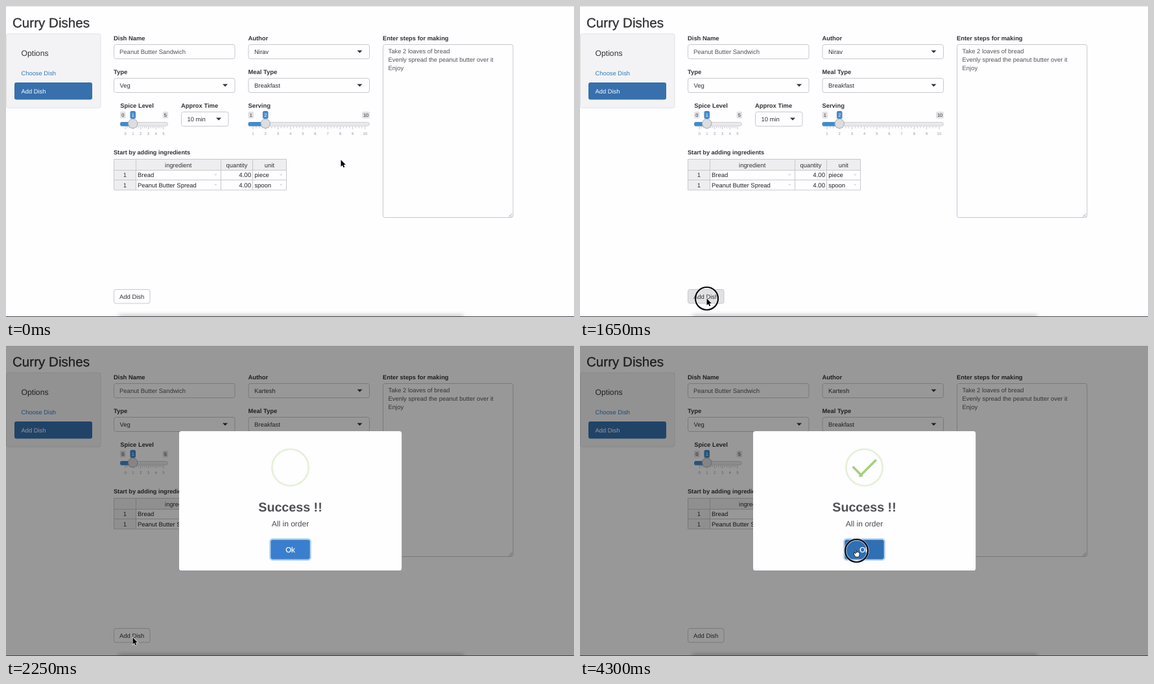
An HTML page for the animation above (4350 ms loop, 876 by 480 pixels).

```html
<!DOCTYPE html>
<html lang="en">
<head>
<meta charset="utf-8">
<title>Dish form</title>
<style>
html, body { margin: 0; width: 100%; height: 100%; overflow: hidden; background: #fefdff; }
svg { display: block; }
text { font-family: "Liberation Sans", Arial, sans-serif; text-rendering: geometricPrecision; white-space: pre; }
</style>
</head>
<body>
<svg width="876" height="480" viewBox="0 0 876 480">
  <defs>
    <filter id="soft" x="-5%" y="-200%" width="110%" height="500%"><feGaussianBlur stdDeviation="3.5"/></filter>
  </defs>
  <g id="page"></g>
  <rect id="shade" width="876" height="480" opacity=".4"/>
  <g id="modal">
    <rect x="267" y="133" width="343.2" height="215" rx="3.6" fill="#fefdff"/>
    <circle cx="438.5" cy="189" r="28.2" fill="none" stroke="#e5f0d5" stroke-width="2.6"/>
    <g transform="translate(409 161) scale(.718)" stroke="#a5d07c" stroke-width="5" stroke-linecap="round">
      <path id="tip"/><path id="long"/>
    </g>
    <g id="dialog"></g>
  </g>
  <path d="M0 .5H876" stroke="#e4e4e6"/>
  <path d="M0 479.5H876" stroke="#444"/>
  <g id="ring" fill="none">
    <circle r="17.3" stroke="#fff" stroke-width="4" opacity=".55"/>
    <circle r="17.5" stroke="#0b0b0e" stroke-width="2.2"/>
  </g>
  <path id="arrow" d="M0 0V10.4L2.4 8.2 4 11.8 5.8 11 4.2 7.5H7.4Z" stroke="#fff" stroke-width="1.2" paint-order="stroke"/>
  <path id="hand" d="M-1.6 4.8V-.2Q-.8-1.3 0-.2V3.2Q1-.1 1.7 2.2 2.8 1.6 3.2 2.8 4.6 2.3 4.6 4V6.6L3.5 9.7H-1.4L-4.2 5.6Q-4-.1-1.6 4.8Z" fill="#fff" stroke="#111" stroke-width=".9" stroke-linejoin="round"/>
</svg>
<script>
const $ = id => document.getElementById(id);
const INK = '#333', BLUE = '#428bca', LINE = '#c8c8cb';
let out = '';

const rect = (x, y, w, h, fill = '#fefdff', stroke = 'none', r = 0, more = '') =>
  out += `<rect x="${x}" y="${y}" width="${w}" height="${h}" rx="${r}" fill="${fill}" stroke="${stroke}" ${more}/>`;
const path = (d, stroke = LINE, fill = 'none', width = 1) =>
  out += `<path d="${d}" stroke="${stroke}" fill="${fill}" stroke-width="${width}"/>`;
const text = (x, y, s, fill = INK, size = 9.45, anchor = 'start', more = '') =>
  out += `<text x="${x}" y="${y}" fill="${fill}" font-size="${size}" text-anchor="${anchor}" ${more}>${s}</text>`;
const bold = 'font-weight="700"';
const label = (x, y, s, size = 9.4) => text(x, y, s, INK, size, 'start', bold);
const field = (x, y, w, h = 22) => rect(x, y, w, h, '#fefdff', LINE, 3);
const down = (x, y, half, fill) => path(`M${x - half} ${y}h${2 * half}l${-half} ${half}Z`, 'none', fill);

function select(x, y, w, s, id = '') {
  field(x, y, w);
  text(x + 9, y + 14.7, s, INK, 9.45, 'start', id && `id="${id}"`);
  down(x + w - 15, y + 9, 4, INK);
}

function badge(x, s, on) {
  const w = s.length > 1 ? 12 : 8.6;
  rect(x - w / 2, on ? 162 : 163, w, on ? 12 : 10.4, on ? BLUE : '#e1e1e3', 'none', 2.5);
  text(x, 170.8, s, on ? '#fff' : INK, 7.4, 'middle');
}

function slider(x, w, handle, first, last, x0, step, value) {
  rect(x + .5, 179.5, w - 1, 5.6, '#e9e9eb', '#cfcfd2', 2.8);
  rect(x, 179, handle - x, 6.6, BLUE, 'none', 2.8);
  for (let i = 0; i <= (last - first) * 4; i++)
    path(`M${x0 + i * step / 4} 186v${i % 4 ? 2.5 : 4.5}`, '#bbb', 'none', .8);
  for (let n = first; n <= last; n++)
    text(x0 + (n - first) * step, 199.3, n, '#999', 6, 'middle');
  badge(x + 4.2, '' + first);
  badge(x + w - (last > 9 ? 6 : 4.2), '' + last);
  badge(handle, '' + value, true);
  out += `<circle cx="${handle}" cy="181.5" r="7.2" fill="#dddde0" stroke="#aaa"/>`;
}

function drawPage() {
  rect(0, 0, 876, 480);
  rect(172, 477, 535, 10, '#000', 'none', 5, 'opacity=".25" filter="url(#soft)"');
  text(10, 32.8, 'Curry Dishes', INK, 20.6, 'start', `stroke="${INK}" stroke-width=".35"`);

  rect(.5, 43, 145.5, 114.2, '#f3f3f5', '#e1e1e4', 3);
  text(23.5, 77, 'Options', INK, 12.2);
  text(23.5, 107.3, 'Choose Dish', '#337ab7', 9.35);
  rect(13, 118, 120, 26.5, '#3770ac', 'none', 3);
  text(23.5, 134.8, 'Add Dish', '#fff', 9.35);

  label(166, 52.5, 'Dish Name');
  field(166.5, 59.5, 186.5);
  text(175, 74, 'Peanut Butter Sandwich', '#555', 9.5);
  label(373.5, 52.5, 'Author');
  select(374, 59.5, 186.5, '', 'author');
  label(166, 104.5, 'Type');
  select(166.5, 111.5, 186.5, 'Veg');
  label(373.5, 104.5, 'Meal Type');
  select(374, 111.5, 186.5, 'Breakfast');

  label(176.3, 156.8, 'Spice Level');
  slider(176, 74, 195.7, 0, 5, 184.2, 11.75, 1);
  label(270, 156.8, 'Approx Time');
  select(270.5, 163.5, 72.5, '10 min');
  label(373.5, 156.8, 'Serving');
  slider(373.5, 187.5, 400.2, 1, 10, 381, 19.2, 2);

  label(581, 52.5, 'Enter steps for making');
  field(581.5, 59.5, 200.5, 267);
  ['Take 2 loaves of bread', 'Evenly spread the peanut butter over it', 'Enjoy']
    .forEach((s, i) => text(589.5, 73.4 + i * 12.8, s, '#555'));
  path('M775.5 325.5l5-5M778.5 325.5l2-2', '#888', 'none', .8);

  label(166, 229, 'Start by adding ingredients', 9.15);
  rect(166.5, 236.5, 266, 47.5, '#fefdff');
  rect(166.5, 236.5, 266, 17, '#eeeef0');
  rect(166.5, 236.5, 34, 47.5, '#eeeef0');
  path('M166.5 236.5h266v47.5h-266ZM166.5 253.5h266M166.5 268.5h266M200.5 236.5v47.5M331.5 236.5v47.5M380.5 236.5v47.5');
  [['ingredient', 265.7], ['quantity', 356], ['unit', 406.3]]
    .forEach(([s, x]) => text(x, 248.8, s, INK, 9.4, 'middle'));
  [['Bread', 'piece'], ['Peanut Butter Spread', 'spoon']].forEach(([name, unit], i) => {
    const y = 264.4 + i * 15.3;
    text(183.3, y, '1', INK, 9.45, 'middle');
    text(203, y, name, '#222');
    text(378, y, '4.00', '#222', 9.6, 'end');
    text(383.3, y, unit, '#222');
    down(323.2, y - 5, 2.6, '#dcdce0');
    down(424.2, y - 5, 2.6, '#dcdce0');
  });

  rect(166.5, 437.5, 55.5, 21.5, '#fefdff', LINE, 3, 'id="add"');
  text(194.2, 451.6, 'Add Dish', INK, 9.45, 'middle');
}

function drawDialog() {
  text(438.5, 257, 'Success !!', '#505053', 19.7, 'middle', bold);
  text(438.5, 280.2, 'All in order', '#4b4b4e', 12, 'middle');
  rect(407, 299.3, 63, 32.6, '#fefdff', '#a9cdec', 4, 'stroke-width="1.6"');
  rect(408.2, 300.5, 60.6, 30.2, '#397fcd', 'none', 3, 'id="ok"');
  text(438.5, 320, 'Ok', '#fff', 11.4, 'middle', 'stroke="#fff" stroke-width=".25"');
}

drawPage();
$('page').innerHTML = out;
out = '';
drawDialog();
$('dialog').innerHTML = out;

// The standard CSS "ease" curve, solved by bisection.
function ease(x) {
  const bez = (a, b, u) => 3 * a * u * (1 - u) ** 2 + 3 * b * u * u * (1 - u) + u ** 3;
  let lo = 0, hi = 1;
  for (let i = 0; i < 20; i++) {
    const mid = (lo + hi) / 2;
    bez(.25, .25, mid) < x ? lo = mid : hi = mid;
  }
  return bez(.1, 1, lo);
}
const smooth = x => x * x * (3 - 2 * x);

// Each key is [time, ...values].
function track(keys, t, curve = ease) {
  if (t <= keys[0][0]) return keys[0].slice(1);
  for (let i = 1; i < keys.length; i++) {
    const a = keys[i - 1], b = keys[i];
    if (t < b[0]) {
      const k = curve((t - a[0]) / (b[0] - a[0]));
      return a.slice(1).map((v, j) => v + (b[j + 1] - v) * k);
    }
  }
  return keys[keys.length - 1].slice(1);
}

const POP = [[0, .7], [135, 1.05], [240, .95], [300, 1]];
// width, left or right offset, top
const TIP = [[405, 0, 1, 19], [525, 50, -8, 37], [630, 17, 21, 48], [750, 25, 14, 45]];
const LONG = [[487, 0, 46, 54], [630, 55, 0, 35], [750, 47, 8, 38]];
const MOVES = [
  [200, 516.5, 237.5], [1050, 273.5, 422.5], [1100, 272, 424], [1500, 195.5, 451.5],
  [2750, 195.5, 451.5], [3250, 420.5, 327.5], [3850, 420.5, 327.5], [4000, 426.5, 317.5]
];
const LOOP = 4350, TICK = 50, POP_START = 1919;

const show = (id, on) => $(id).setAttribute('display', on ? 'inline' : 'none');
const set = (id, name, v) => $(id).setAttribute(name, v);

function stroke(id, w, cx, cy, slope) {
  const d = w / 2 * Math.SQRT1_2;
  show(id, w > .5);
  set(id, 'd', `M${cx - d} ${cy - d * slope}L${cx + d} ${cy + d * slope}`);
}

function render(t) {
  const pop = t - POP_START;
  const shaded = t >= 2100, onOk = t >= 3900;
  const [x, y] = track(MOVES, t, smooth);
  const at = `translate(${x} ${y})`;

  $('author').textContent = t < 2000 ? 'Nirav' : 'Kartesh';
  set('add', 'fill', !shaded && x < 222 && y > 437 ? '#e1e1e3' : '#fefdff');
  show('shade', shaded);
  show('modal', t >= 2050);
  const scale = shaded ? track(POP, pop)[0] : .7;
  set('modal', 'transform', `translate(438.5 240.5) scale(${scale}) translate(-438.5 -240.5)`);

  const [tw, left, ttop] = track(TIP, pop);
  stroke('tip', tw, left + tw / 2, ttop + 2.5, 1);
  const [lw, right, ltop] = track(LONG, pop);
  stroke('long', lw, 80 - right - lw / 2, ltop + 2.5, -1);

  set('ok', 'fill', onOk ? '#2f6fb3' : '#397fcd');
  show('ring', t >= 1500 && t < 1700 || t >= 4150);
  set('ring', 'transform', at);
  show('arrow', !onOk);
  show('hand', onOk);
  set('arrow', 'transform', at);
  set('hand', 'transform', at);
}

const start = performance.now();
function loop() {
  const t = (performance.now() - start) % LOOP;
  render(Math.floor(t / TICK) * TICK);
  requestAnimationFrame(loop);
}
loop();
</script>
</body>
</html>
```
